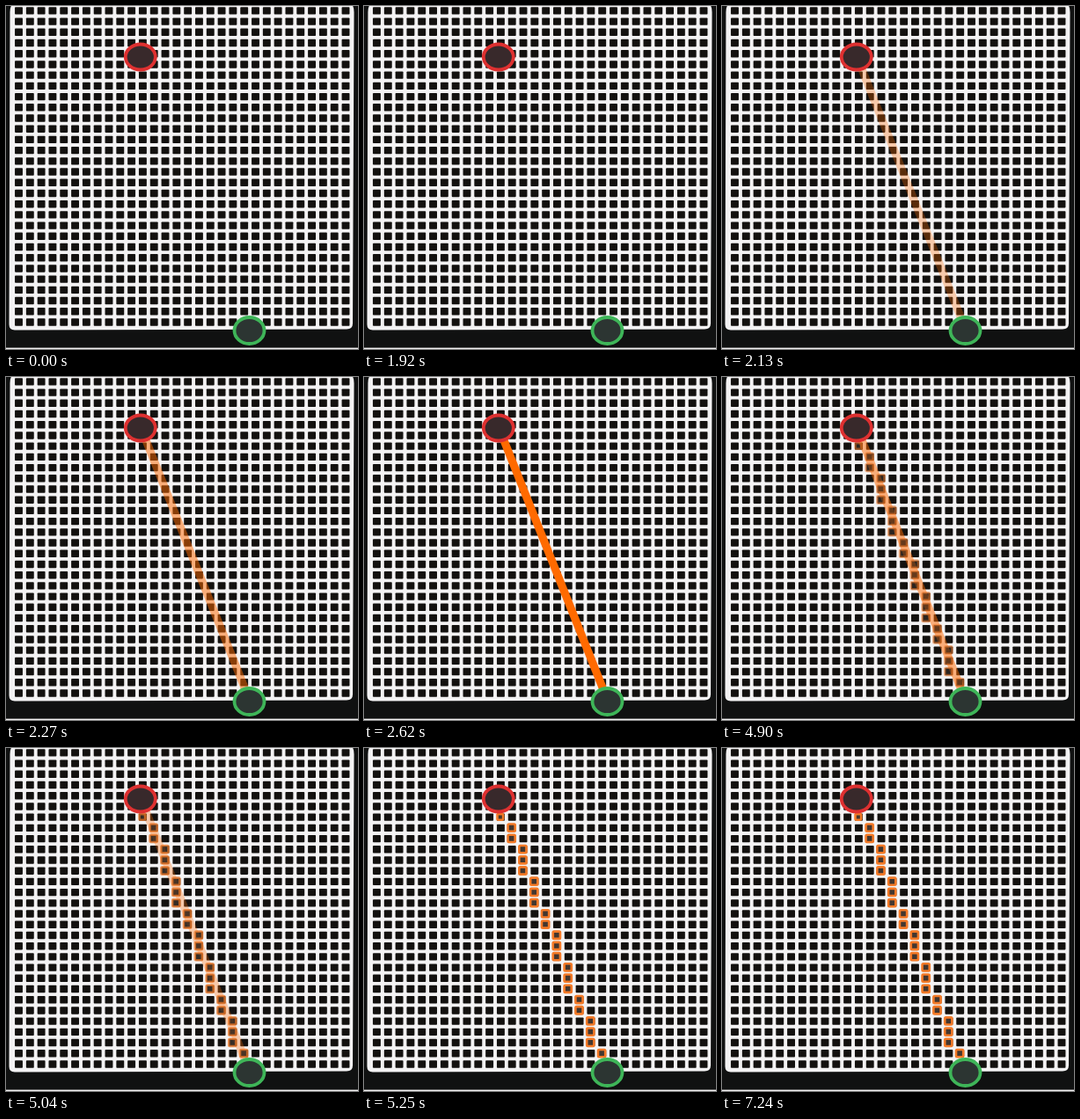
These frames come from a looping animation (400x390 px, 8040 ms). An HTML page with a canvas:

```html
<!DOCTYPE html>
<html lang="en">
<head>
<meta charset="utf-8">
<title>Line to grid cells</title>
<style>
html, body { margin: 0; width: 100%; height: 100%; overflow: hidden; background: #101111; }
canvas { display: block; }
</style>
</head>
<body>
<canvas id="stage" width="400" height="390"></canvas>
<script>
const ctx = document.getElementById('stage').getContext('2d');
const LOOP = 8040, STEP = 70, COUNT = 30;
const colX = c => 14.5 + c * 12.81;
const rowY = r => 5.4 + r * 12.21;

function box(x, y, w, h, radius, fill, stroke, width) {
  ctx.beginPath();
  ctx.roundRect(x - w / 2, y - h / 2, w, h, radius);
  ctx.fillStyle = fill;
  ctx.fill();
  if (!stroke) return;
  ctx.strokeStyle = stroke;
  ctx.lineWidth = width;
  ctx.stroke();
}

function drawBoard() {
  ctx.fillStyle = '#101111';
  ctx.fillRect(0, 0, 400, 390);
  ctx.fillStyle = '#f3f2f3';
  ctx.fillRect(0, 388.6, 400, 1.4);
  ctx.beginPath();
  ctx.moveTo(7, -2);
  ctx.lineTo(393, -2);
  ctx.quadraticCurveTo(395.5, 1, 395.5, 7);
  ctx.lineTo(394, 361);
  ctx.quadraticCurveTo(394, 367.5, 387, 367.5);
  ctx.lineTo(10, 368.5);
  ctx.quadraticCurveTo(3.5, 368.5, 3.5, 362);
  ctx.lineTo(4.5, 7);
  ctx.quadraticCurveTo(4.5, 1, 7, -2);
  ctx.fill();
  for (let r = 0; r < COUNT; r++)
    for (let c = 0; c < COUNT; c++)
      box(colX(c), rowY(r), 8.9, 8.4, 0.8, '#13110f');
}

function drawLine() {
  ctx.strokeStyle = '#ff6a00';
  ctx.lineWidth = 9;
  ctx.beginPath();
  ctx.moveTo(157, 67);
  ctx.lineTo(273, 358);
  ctx.stroke();
}

function drawCells() {
  for (let i = 0; i < 23; i++) {
    const x = colX(Math.floor(11.9 + 0.375 * i)) - 0.6;
    const y = rowY(6 + i) - 0.2;
    const size = i ? 8.2 : 6.6;
    box(x, y, size, size, 1.2, '#44372f', '#f47a27', 2.6);
  }
}

function ring(x, y, rx, ry, fill, stroke) {
  ctx.beginPath();
  ctx.ellipse(x, y, rx, ry, 0, 0, Math.PI * 2);
  ctx.fillStyle = fill;
  ctx.fill();
  ctx.strokeStyle = stroke;
  ctx.lineWidth = 3.8;
  ctx.stroke();
}

function layer(alpha, draw) {
  ctx.globalAlpha = alpha;
  if (alpha > 0) draw();
  ctx.globalAlpha = 1;
}

// Stepped 700 ms fade
const fade = (t, start) =>
  Math.min(1, Math.max(0, Math.floor((t - start) / STEP) / 10));

function render(now) {
  const t = now % LOOP;
  const toCells = fade(t, 4550);
  drawBoard();
  layer(fade(t, 1920) * (1 - toCells), drawLine);
  layer(toCells, drawCells);
  ring(152.8, 58, 17, 14.5, '#38292b', '#de3030');
  ring(276.5, 369, 17, 15, '#2c3532', '#3eb558');
}

const start = performance.now();
function tick() {
  render(performance.now() - start);
  requestAnimationFrame(tick);
}
tick();
</script>
</body>
</html>
```
